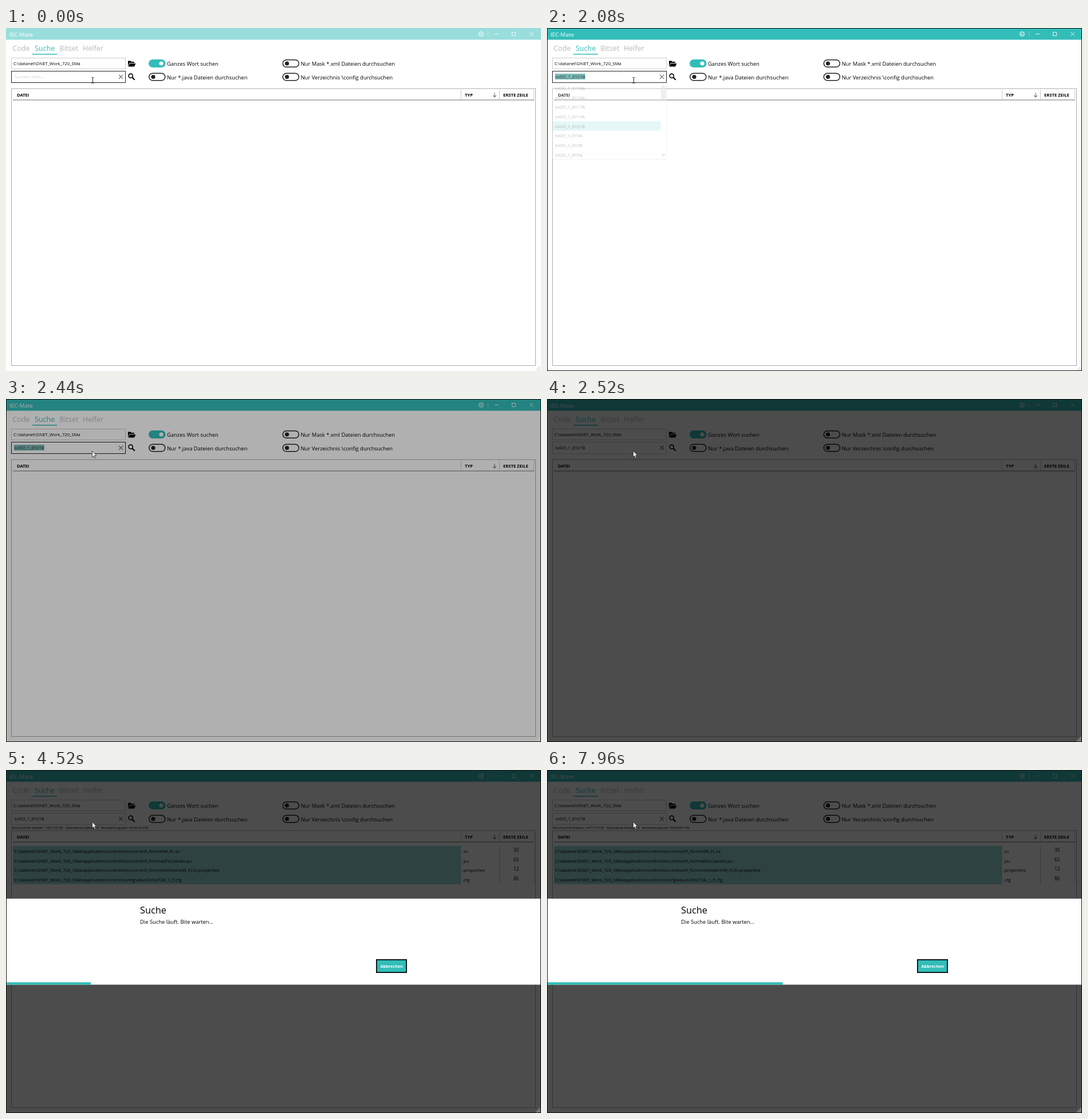
Animation, 934 px wide and 600 px high, one loop 8000 ms. Source, as an HTML page with a canvas:

```html
<!DOCTYPE html>
<html lang="de">
<head>
<meta charset="utf-8">
<title>Suche</title>
<style>
html, body { margin: 0; width: 100%; height: 100%; overflow: hidden; background: #fff; }
canvas { display: block; }
</style>
</head>
<body>
<canvas id="stage" width="934" height="600"></canvas>
<script>
const g = document.getElementById('stage').getContext('2d');
const LOOP = 8000, STEP = 40;
const TEAL = '#33bdb9', PALE = '#99dedc';
const SMALL = 7.62, LABEL = 9.41;
const TOTAL = 10158;

const ITEMS = ['10A', '16A', '17B', '19A', '21B', '3A', '3B', '5A'].map(s => 'svDO_1_EY' + s);
const ROOT = 'C:\\datanet\\DNET_Work_720_SMa';
const APP = ROOT + '\\application\\control\\';
const ROWS = [
  ['ieccontrol\\fl_form\\HW_FL.sv', '.sv', 30, 2800],
  ['ieccontrol\\fl_form\\abFLCaiodio.pu', '.pu', 65, 3000],
  ['ieccontrol\\fl_form\\hmi\\text\\HW_FLSv.properties', '.properties', 12, 3280],
  ['config\\kbus\\Dm272A_1_5.cfg', '.cfg', 86, 3600]
];
const KEYS = [680, 760, 840, 920];
const DOWNS = [1400, 1480, 1560, 1640, 1720];
const SCAN = [[2485, 0], [4520, 1601], [6600, 3192], [7960, 4471], [8000, 4508]];

const clamp = x => Math.max(0, Math.min(1, x));
const ramp = (t, from, span) => clamp((t - from) / span);
const passed = (list, t) => list.filter(x => t >= x).length;

function scanned(t) {
  let i = 1;
  while (i < SCAN.length - 1 && t > SCAN[i][0]) i++;
  const [a, b] = [SCAN[i - 1], SCAN[i]];
  return Math.round(a[1] + (b[1] - a[1]) * ramp(t, a[0], b[0] - a[0]));
}

function text(s, x, y, size, color = '#000', weight = 400, align = 'left') {
  g.font = `${weight} ${size}px "Open Sans", "Noto Sans", sans-serif`;
  g.fillStyle = color;
  g.textAlign = align;
  g.fillText(s, x, y);
}

function box(x, y, w, h, color) {
  g.fillStyle = color;
  g.fillRect(x, y, w, h);
}

function frame(x, y, w, h, color, width = 1) {
  g.strokeStyle = color;
  g.lineWidth = width;
  g.strokeRect(x + width / 2, y + width / 2, w - width, h - width);
}

function path(points, color, width) {
  g.beginPath();
  points.forEach(([x, y]) => g.lineTo(x, y));
  if (width) {
    g.strokeStyle = color;
    g.lineWidth = width;
    g.stroke();
  } else {
    g.fillStyle = color;
    g.fill();
  }
}

function disc(x, y, r, color, width) {
  g.beginPath();
  g.arc(x, y, r, 0, Math.PI * 2);
  if (width) {
    g.strokeStyle = color;
    g.lineWidth = width;
    g.stroke();
  } else {
    g.fillStyle = color;
    g.fill();
  }
}

function cross(x, y, r, color, width) {
  path([[x - r, y - r], [x + r, y + r]], color, width);
  path([[x - r, y + r], [x + r, y - r]], color, width);
}

function titleBar(active) {
  const ink = active ? 'rgba(255,255,255,.85)' : 'rgba(255,255,255,.8)';
  box(0, 0, 934, 20.5, active ? TEAL : PALE);
  text('IEC-Mate', 6, 15, 9.85, '#fff');
  disc(829.5, 10.5, 3.7, ink, 1);
  disc(829.5, 10.5, 1.5, ink, 0.9);
  for (let i = 0; i < 8; i++) {
    const a = i * Math.PI / 4, c = Math.cos(a), s = Math.sin(a);
    path([[829.5 + 3.8 * c, 10.5 + 3.8 * s], [829.5 + 5 * c, 10.5 + 5 * s]], ink, 1.3);
  }
  box(841, 5, 1, 11, 'rgba(255,255,255,.3)');
  box(853, 10, 7, 1, ink);
  frame(883, 7, 7, 7, ink);
  cross(917.5, 10.5, 3.2, ink, 1);
}

function toggle(x, y, on, label) {
  g.beginPath();
  g.roundRect(x + 0.75, y - 6.25, 28, 12.5, 6.25);
  g.lineWidth = 1.5;
  g.strokeStyle = on ? TEAL : '#222';
  g.fillStyle = on ? TEAL : '#fff';
  g.fill();
  g.stroke();
  disc(on ? x + 22 : x + 8, y, 3.6, on ? '#fff' : '#222');
  text(label, x + 32, y + 4, LABEL);
}

function tools() {
  text('Code', 11.3, 40, 12.5, '#b9b9b9');
  text('Suche', 50, 40, 12.5, TEAL);
  text('Bitset', 93.3, 40, 12.5, '#b9b9b9');
  text('Helfer', 134, 40, 12.5, '#b9b9b9');
  box(46, 45, 43, 1.5, TEAL);

  frame(9, 52, 200, 20, '#ccc');
  text(ROOT, 13, 65, SMALL);

  path([[213, 67], [213, 57.5], [217.5, 57.5], [219, 59], [224, 59], [224, 61], [215.5, 61], [213, 67]], '#000');
  path([[216, 62], [226.5, 62], [224, 67.5], [213.5, 67.5]], '#000');
  disc(217.7, 83.7, 3.6, '#000', 1.6);
  path([[220.5, 86.5], [224.7, 90.7]], '#000', 2.1);

  toggle(249, 62, true, 'Ganzes Wort suchen');
  toggle(249, 85.5, false, 'Nur *.java Dateien durchsuchen');
  toggle(482.5, 62, false, 'Nur Mask *.xml Dateien durchsuchen');
  toggle(482.5, 85.5, false, 'Nur Verzeichnis \\config durchsuchen');
}

function searchField(t, picked) {
  const typed = 'svdo'.slice(0, passed(KEYS, t));
  const value = picked ? ITEMS[picked - 1] : typed;
  frame(9, 75, 200, 21, t < 2480 ? '#222' : '#ccc');
  g.font = `400 ${SMALL}px "Open Sans", "Noto Sans", sans-serif`;
  const width = g.measureText(value).width;
  const marked = picked && t < 2480;
  if (marked) box(14, 80, width + 0.5, 10, '#7abab7');
  if (value) text(value, 14.5, 88, SMALL, marked ? '#333' : '#000');
  else text('Suchen nach...', 15, 88, SMALL, '#d0d0d0');
  const caret = value ? !picked : t >= 80 && t < 440;
  if (caret) box(Math.round(14.5 + width), 79, 1, 11, '#000');
  cross(200.5, 85.3, 3.5, '#666', 1.2);
}

function table(t) {
  frame(9, 105.5, 916, 485.5, '#aaa');
  text('DATEI', 19, 120, SMALL, '#000', 700);
  text('TYP', 801, 120, SMALL, '#000', 700);
  text('ERSTE ZEILE', 868, 120, SMALL, '#000', 700);
  box(12, 125, 910, 1.7, '#aaa');
  for (const x of [794, 861, 921]) box(x, 108, 1, 17, '#ccc');
  path([[853, 113], [853, 121]], '#666', 1);
  path([[850.3, 118], [853, 120.8], [855.7, 118]], '#666', 1.1);

  ROWS.forEach(([file, type, line, from], i) => {
    if (t < from) return;
    const y = 133 + i * 16.67;
    box(12, y, 782.5, 16.8, PALE);
    box(861, y, 1, 16.67, '#ccc');
    box(921, y, 1, 16.67, '#ccc');
    text(APP + file, 14.5, y + 12, SMALL);
    text(type, 797, y + 12, SMALL);
    text(line, 890.7, y + 10, 8.2, '#000', 400, 'center');
  });
}

function status(t) {
  const ms = Math.round(3378 + (t - 4520) * 1.666);
  const clock = '00:00:' + (ms / 1000).toFixed(3).padStart(6, '0');
  const found = passed(ROWS.map(r => r[3]), t);
  text(`Durchsuchte Dateien: ${scanned(t)}/${TOTAL}   Gefundene Dateien: ${found}   Verarbeitungszeit: ${clock}`,
    10, 102.5, 5.65);
}

function popup(t, picked) {
  const alpha = ramp(t, 920, 160) * (1 - ramp(t, 1960, 160));
  if (!alpha) return;
  g.globalAlpha = alpha;
  box(9, 96, 200, 134, '#fff');
  frame(9, 95.5, 200, 134.5, '#ccc');
  ITEMS.forEach((s, i) => {
    const y = 96.5 + i * 16.67;
    if (i === picked - 1) box(10, y, 188.5, 16.67, PALE);
    text(s, 14, y + 11.5, SMALL);
  });
  box(199, 107.5, 8.5, 16.5, '#bababa');
  path([[199, 104], [203, 100], [207, 104]], '#999');
  path([[199, 221], [203, 225], [207, 221]], '#999');
  g.globalAlpha = 1;
}

function dialog(t) {
  g.globalAlpha = ramp(t, 2640, 160) ** 2;
  box(1, 225, 932, 150.5, '#fff');
  text('Suche', 234, 250.5, 16.3);
  text('Die Suche läuft. Bite warten...', 234, 269, 9.4);
  box(646, 331, 54, 24, TEAL);
  frame(646, 331, 54, 24, '#000', 1.7);
  text('Abbrechen', 673.3, 346, 7.35, '#fff', 700, 'center');
  box(1, 371.3, scanned(t) / TOTAL * 933, 4.2, TEAL);
  g.globalAlpha = 1;
}

function grip() {
  for (let r = 0; r < 4; r++)
    for (let c = 0; c <= r; c++) box(931 - c * 2, 592 + r * 2 - 0.5, 1.2, 1.2, '#c4c4c4');
}

function pointer(t) {
  if (t < 2280) {
    box(151, 87, 1, 9, '#222');
    box(149.5, 86, 1.5, 1, '#222');
    box(152, 86, 1.5, 1, '#222');
    box(149.5, 96, 1.5, 1, '#222');
    box(152, 96, 1.5, 1, '#222');
    return;
  }
  const arrow = [[150.5, 91], [150.5, 101.6], [152.9, 99.4], [154.6, 103.2],
    [156.3, 102.5], [154.7, 98.8], [157.8, 98.5], [150.5, 91]];
  path(arrow, '#fff');
  path(arrow, '#222', 0.8);
}

function draw(t) {
  const active = t >= 80;
  const picked = passed(DOWNS, t);
  box(0, 0, 934, 600, '#fff');
  titleBar(active);
  tools();
  searchField(t, picked);
  table(t);
  if (t >= 2680) status(t);
  popup(t, picked);
  const dim = 0.7 * ramp(t, 2280, 240) ** 2;
  if (dim) box(0, 0, 934, 600, `rgba(0,0,0,${dim})`);
  if (t >= 2680) dialog(t);
  grip();
  if (active) frame(0, 0, 934, 600, '#111');
  pointer(t);
}

const start = performance.now();
function tick() {
  const t = (performance.now() - start) % LOOP;
  draw(Math.floor(t / STEP) * STEP);
  requestAnimationFrame(tick);
}
tick();
</script>
</body>
</html>
```
